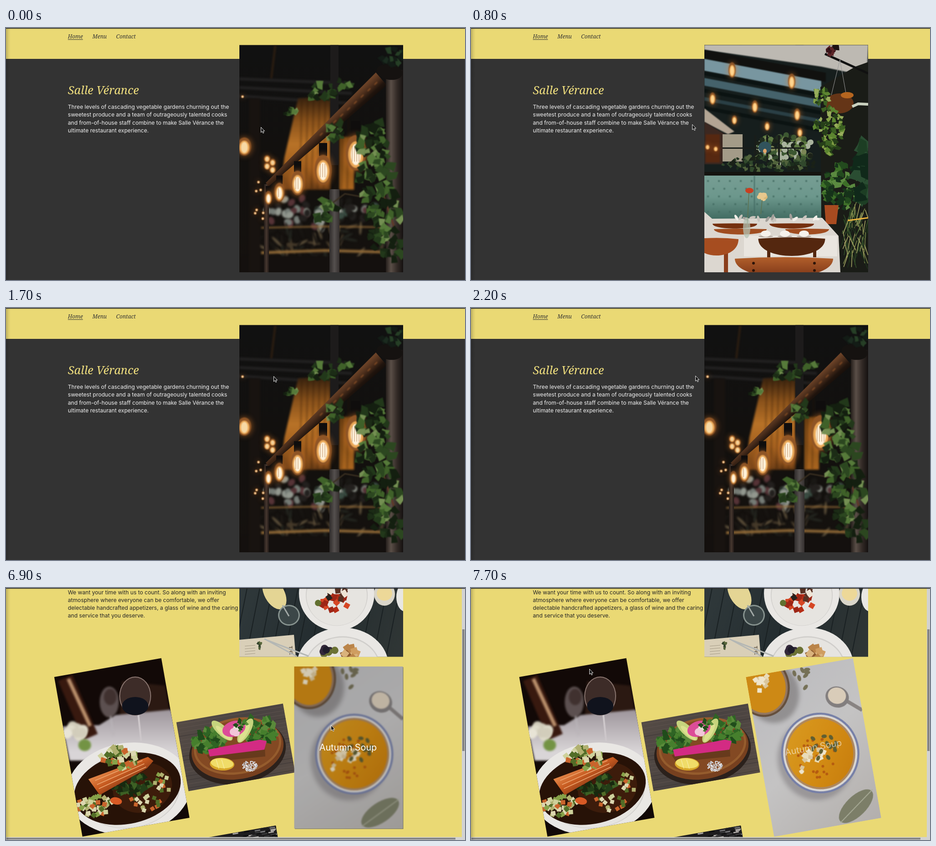
Write an HTML page with a canvas that moves like this. It is 1009 px wide and 555 px high and loops after 8 s.

```html
<!DOCTYPE html>
<html lang="en">
<head>
<meta charset="utf-8">
<title>Restaurant page</title>
<style>
html, body { margin: 0; width: 100%; height: 100%; overflow: hidden; background: #333; }
#stage { position: relative; width: 1009px; height: 555px; overflow: hidden; }
#stage > *, nav span, h1, p { position: absolute; margin: 0; white-space: pre; }
canvas { left: 0; top: 0; }
nav span { top: 9.4px; font: italic 12px/20px Lora, "Noto Serif", serif; color: #333; }
nav u { text-underline-offset: 2px; text-decoration-thickness: 1px; }
h1 { left: 136px; top: 120.5px; font: italic 400 25.2px/30px Lora, "Noto Serif", serif; color: #f0df7e; }
p { left: 136px; font: 12.12px/17.25px Inter, sans-serif; }
#home p { top: 165px; color: #f2f2f2; }
#food p { top: .5px; color: #262626; }
#label { left: 632.5px; top: 173px; width: 239px; height: 357px; text-align: center;
  font: 400 19.8px/357px Inter, sans-serif; color: #fff; }
#arrow { left: 0; top: 0; overflow: visible; }
</style>
</head>
<body>
<div id="stage">
  <canvas id="view" width="1009" height="555"></canvas>
  <div id="home">
    <nav><span style="left:136px"><u>Home</u></span><span style="left:190px">Menu</span><span style="left:242px">Contact</span></nav>
    <h1>Salle Vérance</h1>
    <p>Three levels of cascading vegetable gardens churning out the
sweetest produce and a team of outrageously talented cooks
and from-of-house staff combine to make Salle Vérance the
ultimate restaurant experience.</p>
  </div>
  <div id="food">
    <p>We want your time with us to count. So along with an inviting
atmosphere where everyone can be comfortable, we offer
delectable handcrafted appetizers, a glass of wine and the caring
and service that you deserve.</p>
  </div>
  <div id="label">Autumn Soup</div>
  <svg id="arrow" width="10" height="15"><path d="M.5 .5V12L3.1 9.6 5 13.7 6.9 12.8 5.1 8.9H8.6Z" fill="#111" stroke="#fff" stroke-width=".9"/></svg>
</div>
<script>
const $ = id => document.getElementById(id);
const W = 1009, H = 555, LOOP = 8000, YELLOW = '#ead974', TILT = -10 * Math.PI / 180;
let g, seed;

const rnd = () => {
  seed = seed + 0x6D2B79F5 | 0;
  let v = Math.imul(seed ^ seed >>> 15, 1 | seed);
  v = v + Math.imul(v ^ v >>> 7, 61 | v) ^ v;
  return ((v ^ v >>> 14) >>> 0) / 4294967296;
};
const pick = list => list[rnd() * list.length | 0];
const times = (n, fn) => { for (let i = 0; i < n; i++) fn(i); };

// drawing helpers; points are flat x, y lists
function trace(p) {
  g.beginPath();
  for (let i = 0; i < p.length; i += 2) g.lineTo(p[i], p[i + 1]);
}
function poly(c, ...p) { trace(p); g.fillStyle = c; g.fill(); }
function line(c, w, ...p) { trace(p); g.strokeStyle = c; g.lineWidth = w; g.stroke(); }
function box(c, x, y, w, h) { g.fillStyle = c; g.fillRect(x, y, w, h); }
function oval(c, x, y, rx, ry = rx, a = 0) {
  g.beginPath(); g.ellipse(x, y, rx, ry, a, 0, 7); g.fillStyle = c; g.fill();
}
function fade(x0, y0, x1, y1, ...cols) {
  const f = g.createLinearGradient(x0, y0, x1, y1);
  cols.forEach((c, i) => f.addColorStop(i / (cols.length - 1), c));
  return f;
}
function soft(px, paint) { g.filter = `blur(${px}px)`; paint(); g.filter = 'none'; }
function scatter(n, x, y, rx, ry, put) {
  times(n, () => {
    const a = rnd() * 6.28, r = Math.sqrt(rnd());
    put(x + Math.cos(a) * r * rx, y + Math.sin(a) * r * ry);
  });
}
function dots(n, x, y, rx, ry, w, h, cols) {
  scatter(n, x, y, rx, ry, (dx, dy) => oval(pick(cols), dx, dy, w, h, w === h ? 0 : rnd() * 3));
}
function leaves(n, x, y, rx, ry, size, cols) {
  scatter(n, x, y, rx, ry, (lx, ly) => {
    const a = rnd() * 6.28, s = size * (.6 + rnd() * .7), p = [];
    times(7, i => {
      const r = s * (i ? .45 + i % 2 * .25 : 1);
      p.push(lx + Math.cos(a + i * .9) * r, ly + Math.sin(a + i * .9) * r);
    });
    poly(pick(cols), ...p);
  });
}
function cubes(n, x, y, rx, ry, s, cols) {
  scatter(n, x, y, rx, ry, (cx, cy) => {
    const a = rnd() * 1.5, u = Math.cos(a) * s, v = Math.sin(a) * s;
    poly(pick(cols), cx + u, cy + v, cx - v, cy + u, cx - u, cy - v, cx + v, cy - u);
  });
}
function bulb(x, y, rx, ry, core = '#fff3dc') {
  soft(6, () => oval('rgba(230,130,45,.4)', x, y, rx * 1.2, ry * 1.1));
  soft(1.2, () => {
    oval('#8f5526', x, y, rx, ry);
    oval('#eba958', x, y + ry * .1, rx * .75, ry * .75);
    oval(core, x, y + ry * .1, rx * .5, ry * .6);
  });
}
function plate(x, y, rx, ry, a = 0) {
  oval('#e9e7e4', x, y, rx, ry, a);
  oval('#d0cecb', x, y + 4, rx * .82, ry * .82, a);
  oval('#e6e4e0', x, y + 5, rx * .8, ry * .8, a);
}
function chair(c, x, y, w, h) {
  const l = x - w / 2, r = x + w / 2;
  g.beginPath();
  g.moveTo(l, y);
  g.quadraticCurveTo(x, y - h * .15, r, y);
  g.bezierCurveTo(r, y + h * 1.3, l, y + h * 1.3, l, y);
  g.fillStyle = c; g.fill();
}

// a clipped picture of size w, h centred on cx, cy
function photo(cx, cy, w, h, angle, s, paint) {
  const c = document.createElement('canvas');
  c.width = W; c.height = H;
  g = c.getContext('2d');
  seed = s;
  g.translate(cx, cy); g.rotate(angle);
  g.beginPath(); g.rect(-w / 2, -h / 2, w, h); g.clip();
  g.setTransform(1, 0, 0, 1, 0, 0);
  paint();
  return c;
}

const ivy = ['#1c2c16', '#2c4720', '#3f6129', '#567a3a', '#141f10', '#22381a', '#748f52'];
const fresh = ['#5c8530', '#3c6022', '#829f45', '#263f19', '#98ad5c'];

const lamps = photo(693, 287.75, 360, 500.5, 0, 5, () => {
  box(fade(0, 37, 0, 538, '#111', '#12100e', '#15110e'), 513, 37, 360, 501);
  soft(2, () => {
    line('#3a2411', 3, 592, 38, 583, 112);
    times(3, i => line('#232222', 6, 513, 112 + i * 19, 760, 122 + i * 22));
    poly(fade(0, 155, 0, 356, '#3a230f', '#8a521b', '#b87227', '#a3601f', '#693c16'), 642, 155, 713, 150, 713, 356, 603, 356, 612, 285);
    box(fade(0, 235, 0, 356, '#704214', '#a9651f'), 733, 240, 32, 116);
    times(9, i => line('rgba(40,20,5,.5)', 2, 650 + i * 13, 160, 646 + i * 13, 355));
    dots(70, 695, 405, 135, 36, 9, 7, ['#767c76', '#553336', '#394b41', '#93988f', '#23201e', '#1a1815']);
    dots(60, 700, 470, 150, 38, 15, 3, ['#463a2a', '#181512', '#5a4d38', '#23251f', '#1c1814']);
    times(2, i => line('#8f6836', 6 - i * 3, 560, 495 - i * 55, 700, 490 - i * 53, 850, 494 - i * 55));
    box('#14100e', 513, 503, 360, 36);
    box('#181310', 534, 155, 25, 383);
  });
  box('#1d1b1b', 713, 37, 18, 265);
  box(fade(708, 0, 736, 0, '#252121', '#55504e', '#2b2625'), 711, 355, 22, 183);
  box(fade(566, 0, 579, 0, '#1b1513', '#46372f', '#1a1412'), 567, 344, 11, 194);
  bulb(524, 261, 15, 20, '#f7d9a5');
  times(4, i => bulb(574 + i % 2 * 12, 288 + i * 8, 7, 8, '#f7d9a5'));
  scatter(7, 557, 400, 14, 75, (x, y) => bulb(x, y, 3, 3));
  bulb(520, 151, 3, 3);
  poly(fade(688, 218, 714, 246, '#6b4227', '#4a2d1b', '#20140d', '#120c09'), 571, 341, 813, 98, 837, 126, 577, 349);
  soft(1.5, () => times(9, i => line('#b9692f', 1.5, 690 + i * 15, 237 - i * 14, 696 + i * 15, 231 - i * 14)));
  box(fade(833, 0, 873, 0, '#1b1613', '#5a4e47', '#322a26', '#151110'), 835, 92, 38, 446);
  oval('#151210', 843, 97, 29, 17, .15);
  times(5, u => {
    const x = 577 + 16 * u + 8 * u * u, y = 374 - 8 * u - 4.2 * u * u;
    const rx = 8 + 3.6 * u, ry = 15 + 6 * u, cap = 14 + 5 * u;
    box('#0f0d0d', x - 6 - u, y - ry - cap + 3, 12 + 2 * u, cap);
    bulb(x, y, rx, ry);
    times(u, i => line('rgba(150,85,30,.6)', 1, x - u * 2 + i * 5, y - ry * .4, x - u * 2 + i * 5, y + ry * .5));
  });
  soft(.9, () => {
    line('#5f3928', 4, 826, 355, 842, 405, 858, 452);
    line('#3a2f20', 3, 705, 395, 745, 365, 800, 375);
    leaves(22, 690, 140, 32, 24, 12, ivy);
    leaves(7, 742, 124, 16, 10, 11, ivy);
    leaves(9, 628, 185, 20, 6, 9, ivy);
    leaves(14, 724, 228, 20, 25, 13, ivy);
    leaves(15, 703, 405, 22, 28, 13, ivy);
    leaves(16, 848, 58, 25, 28, 13, ['#131c16', '#1b2b1f', '#263f26']);
    times(130, i => {
      const u = i / 130;
      leaves(1, 808 + 44 * u * u, 215 + 290 * u, 40, 16, 15, ivy);
    });
  });
});

const tables = photo(693, 287.75, 360, 500.5, 0, 11, () => {
  box('#161e1d', 513, 37, 360, 501);
  // roof beams and panes share one slope
  const slope = (c, y, h, x1 = 770) => poly(c, 513, y, x1, y + (x1 - 513) * .19, x1, y + h + (x1 - 513) * .19, 513, y + h);
  soft(1, () => {
    poly('#bdb9b2', 513, 37, 873, 37, 870, 106, 770, 85, 513, 48);
    slope('#11110f', 48, 20, 780);
    times(3, i => slope(['#7896a0', '#45626b', '#2a3f45'][i], 68 + i * 42, 26 - i * 9));
    times(3, i => slope('#0b1312', 96 + i * 38, 8));
    poly('#b3a594', 513, 177, 579, 228, 565, 234, 513, 207);
    poly('#3c2821', 513, 207, 560, 235, 553, 300, 513, 300);
  });
  soft(1.5, () => {
    box('#562811', 516, 234, 31, 62);
    times(2, i => bulb(520 + i * 18, 262 + i * 4, 5, 6, '#ffc983'));
    box('#a39b88', 553, 234, 44, 60);
    dots(160, 690, 268, 66, 34, 6, 6, ['#a9b39d', '#3c5731', '#5c7841', '#202c1e', '#7c8757', '#1c2219']);
    times(4, i => box('#191d1a', 597 + i * 26, 236, 4, 70));
    box('#191d1a', 553, 263, 180, 3);
    oval('#31535c', 646, 263, 14, 13); oval('#e3a669', 646, 271, 4, 5);
    leaves(90, 655, 299, 105, 16, 8, ['#31482c', '#50623b', '#1c2d1c', '#1a2117']);
    box('#151410', 513, 317, 260, 9);
  });
  box(fade(0, 324, 0, 420, '#779e94', '#6c978c', '#426c62'), 513, 325, 258, 97);
  soft(1, () => {
    line('#436b63', 2, 623, 325, 623, 415);
    times(55, i => oval('#426960', 521 + i % 11 * 24 + (i / 11 | 0) % 2 * 12, 337 + (i / 11 | 0) * 17, 2));
  });
  times(8, i => {
    const row = (i + 1) / 3 | 0, n = (i + 1) % 3 - (row ? 0 : 1);
    const x = [574, 531, 579][row] + n * [131, 93, 72][row], y = 81 + row * 71 - (row > 1 ? 33 : 0) + (x - 513) * .19;
    bulb(x, y, 8 - row, 17 - row * 3.5, '#ffd691');
  });
  poly('#1a1c17', 768, 130, 845, 85, 873, 75, 873, 538, 800, 538, 770, 420);
  line('#111', 5, 778, 57, 873, 100);
  times(2, i => line('#999', 1, 811, 70, 792 + i * 33, 148));
  leaves(14, 795, 47, 16, 11, 9, ['#3a1419', '#1c1112', '#5c2528']);
  oval('#653517', 810, 166, 31, 22); oval('#b5651f', 827, 148, 14, 7);
  soft(.7, () => {
    leaves(18, 771, 153, 16, 22, 9, fresh);
    leaves(75, 786, 225, 30, 52, 9, fresh);
    leaves(90, 815, 350, 40, 52, 11, ['#3d6f28', '#234a1e', '#5b8a40', '#16321a']);
  });
  line('#cad1bf', 6, 838, 173, 851, 167, 873, 168);
  leaves(28, 861, 330, 16, 70, 22, ['#1d3e24', '#10291a', '#2a4d32']);
  poly('#a84b20', 777, 390, 808, 390, 803, 432, 780, 432);
  scatter(80, 845, 440, 30, 60, (x, y) =>
    line(pick(['#7d8a4a', '#33502a', '#a9a966', '#1e331c']), 1.5, x, y, x + (rnd() - .5) * 34, y + 20 + rnd() * 24));
  line('#e9b13c', 3, 828, 424, 873, 418);
  poly('#dcd7d0', 513, 405, 530, 420, 772, 418, 808, 458, 812, 538, 513, 538);
  soft(.7, () => {
    dots(14, 660, 419, 110, 4, 7, 3, ['#f3efe9', '#a39f9a', '#c9c4bd']);
    times(2, i => chair('#75300f', 580 + i * 125, 431, 98, 11));
    times(2, i => chair('#a04d20', 592 + i * 147, 443, 116 - i * 20, 12));
    box('#e9e5df', 600, 457, 205, 46);
    times(3, i => { oval('#b5aaa0', 648 + i * 42, 459, 16, 2); oval('#f6f2ec', 648 + i * 42, 453, 11, 7); });
  });
  box('#8a3e1c', 556, 490, 9, 48);
  chair('#a64d20', 540, 465, 96, 37);
  times(2, i => box('#54270f', 651 + i * 101, 485, 7, 20));
  chair('#54270f', 705, 464, 147, 39);
  chair(fade(0, 503, 0, 538, '#b4612c', '#8a401c'), 688, 508, 216, 42);
  times(4, i => oval('#2d1409', 621 + i % 2 * 134, 518 + (i >> 1) * 16, 3));
  line('#5e7250', 1.5, 611, 361, 607, 440);
  oval('rgba(180,195,180,.75)', 606, 440, 8, 23);
  oval('#c93f20', 612, 358, 9, 6);
  dots(6, 641, 372, 9, 5, 6, 5, ['#e8c88d', '#d9b877']);
  line('#5e7250', 1.5, 640, 379, 637, 410);
});

const dinner = photo(693, 71.5, 360, 160, 0, 3, () => {
  box(fade(513, 0, 873, 151, '#30393b', '#242d30', '#303635'), 513, 0, 360, 152);
  times(13, i => line('#1a2123', 2, 500 + i * 28, 151, 530 + i * 28, 0));
  oval('#e4d594', 590, 12, 22, 38, -.5);
  oval('#87938f', 622, 60, 24, 23); oval('#3c4748', 622, 60, 21, 20);
  line('#a3aaa7', 3, 608, 38, 622, 62);
  plate(727, 12, 83, 82);
  cubes(17, 727, 33, 33, 20, 8, ['#b62d16', '#d64624', '#9d2616']);
  cubes(13, 725, 11, 25, 20, 8, ['#eee4d6', '#27211d', '#593224']);
  oval('#62702f', 686, 33, 7);
  oval('#d9d5c9', 832, 13, 23, 26); oval('#edd898', 832, 12, 17, 16);
  oval('#e8e7e3', 878, 20, 20, 32);
  plate(740, 172, 101, 85);
  cubes(14, 757, 143, 20, 13, 10, ['#ba8449', '#cf9d60', '#8a592e', '#d9b27c']);
  dots(9, 711, 139, 17, 9, 8, 8, ['#6b7134', '#201d2b', '#33283a']);
  poly('#d9cfb8', 513, 114, 633, 103, 637, 152, 513, 152);
  g.fillStyle = '#53483b'; g.font = 'bold 10px Lato, sans-serif';
  g.save(); g.translate(622, 128); g.rotate(1.5); g.fillText('THE', 0, 0); g.restore();
  times(4, i => line('#a59b86', 1, 525, 128 + i * 6, 548, 126 + i * 6));
  leaves(7, 555, 126, 6, 9, 5, ['#58663a', '#32432b']);
  times(2, i => line('#b4b7b4', 3, 568 + i * 6, 112 + i * 3, 640 + i * 25, 151 - i));
});

const salmon = photo(254.7, 351, 239, 357, TILT, 8, () => {
  box('#120907', 100, 150, 310, 400);
  soft(2, () => {
    poly('#2b1912', 255, 205, 350, 215, 365, 300, 250, 290);
    poly(fade(0, 270, 0, 360, '#9e969c', '#d9d5d7'), 124, 305, 205, 302, 240, 280, 362, 268, 410, 380, 140, 380);
    line('#38190f', 34, 130, 198, 186, 328);
    line('#b98f6b', 8, 137, 200, 185, 304);
    dots(9, 152, 316, 22, 16, 11, 11, ['#dfdbca', '#d2cdbb', '#e8e4d6']);
    oval('#739344', 173, 346, 14, 13);
    oval('rgba(125,112,111,.7)', 227, 251, 21, 34); oval('#40312f', 229, 240, 14, 18);
    line('#bab5b9', 3, 230, 282, 236, 325);
  });
  oval('#8a7670', 284, 238, 35, 43); oval('#3d2c28', 284, 238, 33, 41); oval('#10131d', 284, 260, 29, 20);
  line('#cdc7ca', 4, 291, 280, 297, 337);
  plate(270, 442, 137, 101, -.13);
  oval('#271207', 267, 442, 119, 77, -.23); oval('#3d1c0b', 300, 440, 66, 54, -.3);
  const dice = ['#ced19b', '#87a249', '#dcd7b0', '#c9642c', '#b0b070', '#526d27'];
  leaves(42, 270, 430, 47, 23, 12, ['#233e18', '#3d6024', '#17290f']);
  cubes(44, 197, 480, 42, 22, 7, dice);
  cubes(18, 305, 470, 34, 20, 6, dice);
  cubes(12, 345, 428, 18, 24, 6, dice);
  poly(fade(230, 390, 260, 440, '#e58a4b', '#c65a20', '#843715'), 181, 421, 312, 372, 324, 381, 310, 397, 206, 456);
  times(3, i => line('#eda670', 1.5, 196 + i * 4, 424 + i * 9, 300 + i * 4, 380 + i * 7));
  cubes(46, 247, 374, 40, 24, 8, dice);
  oval('#d85a25', 242, 469, 13, 8, .2);
});

const toast = photo(505, 351, 238, 154, TILT, 4, () => {
  box(fade(380, 280, 630, 430, '#554b45', '#494341', '#574b44'), 370, 250, 270, 200);
  times(31, i => line(pick(['#3c3635', '#5d524d']), 1, 370, 230 + i * 9, 640, 184 + i * 9));
  times(4, i => oval(['#2b211c', '#77401f', '#955c2d', '#834923'][i], 509, 360 - Math.min(i, 2) * 6, 107 - i * 5, 72 - i * 5, -.17));
  const rocket = ['#2f6424', '#467f2d', '#204c1b', '#5a8a3a'];
  leaves(55, 450, 340, 36, 28, 12, rocket);
  leaves(50, 556, 314, 36, 30, 12, rocket);
  poly('#673a1c', 441, 368, 569, 352, 570, 371, 451, 383);
  poly('#d32b83', 444, 356, 558, 334, 573, 337, 568, 356, 448, 371);
  times(2, i => {
    oval('#c6d47d', 475 + i * 51, 314, 30, 11, .75 - i * 1.8);
    oval('#dce18f', 478 + i * 46, 319, 22, 6, .75 - i * 1.8);
  });
  oval('#dc4d98', 501, 310, 26, 17, -.3);
  dots(4, 500, 315, 10, 5, 8, 8, ['#f1c6d8', '#e5e4d3']);
  leaves(12, 517, 304, 13, 12, 7, rocket);
  oval('#d7a629', 475, 388, 27, 14, .05); oval('#f0dc68', 475, 386, 25, 11, .1);
  times(2, i => line('#faf0b5', 1, 462 + i * 12, 378, 468 + i * 12, 398));
  scatter(170, 535, 391, 17, 12, (x, y) => box(pick(['#f0f0f2', '#c3c7d0']), x, y, 2, 2));
});

// drawn upright on its hovered place
const soup = photo(752.5, 351.5, 239, 357, 0, 9, () => {
  box(fade(633, 173, 872, 530, '#bebec2', '#c8c7c7', '#b7b3b0'), 633, 173, 239, 357);
  soft(5, () => { oval('rgba(80,76,76,.4)', 685, 218, 58, 66); oval('rgba(100,95,100,.4)', 753, 378, 84, 90); });
  const bowl = (x, y, rx, ry, rims) => rims.forEach((c, i) => oval(c, x, y, rx - i * 4.5, ry - i * 4.5));
  bowl(666, 200, 59, 67, ['#66503c', '#967963', '#d18c15']);
  bowl(765, 366, 86, 89, ['#7882aa', '#dedbd7', '#b08a61', fade(690, 320, 840, 420, '#dc9c21', '#d78f14', '#cb800d')]);
  dots(35, 758, 373, 45, 47, 3, 3, ['#b95d10']);
  const bread = ['#eee0be', '#dec99e', '#f4ead0'];
  cubes(16, 751, 371, 25, 18, 7, bread);
  cubes(3, 715, 393, 8, 10, 6, bread);
  cubes(13, 667, 195, 26, 18, 7, bread);
  dots(13, 773, 353, 31, 33, 6, 4, ['#616033']);
  dots(7, 757, 200, 27, 26, 7, 4, ['#777258']);
  line('#8b8685', 8, 843, 264, 872, 289);
  oval('#858181', 823, 251, 26, 23, .5); oval('#ddd0bd', 823, 248, 20, 18, .4);
  oval('#7e816a', 822, 495, 48, 22, -.6);
  line('#adaf9b', 2, 782, 525, 864, 465);
});

const next = photo(484, 593, 239, 100, TILT, 6, () => {
  box('#1d1c1d', 350, 520, 260, 40);
  scatter(40, 550, 542, 55, 18, (x, y) => line(pick(['#747476', '#383839', '#0d0d0d', '#aaa6a2']), 3, x, y, x + 12, y - 2));
});

// values at time t from [time, ...values] keys, linear between keys
function at(keys, t) {
  let i = 0;
  while (i < keys.length - 1 && keys[i + 1][0] <= t) i++;
  const a = keys[i], b = keys[i + 1] || a;
  const k = b === a ? 0 : Math.max(0, (t - a[0]) / (b[0] - a[0]));
  return a.slice(1).map((v, n) => v + (b[n + 1] - v) * k);
}
const pointer = [[400, 560, 218], [800, 486, 212], [1300, 371, 199], [1400, 358, 196], [1500, 520, 164],
  [1700, 588, 150], [2100, 588, 150], [2200, 493, 149], [2700, 338, 111]];
const swap = [[500, 0], [800, 1], [1400, 1], [1700, 0], [2200, 0], [2500, 1]];

function drawHome(t) {
  box('#333', 0, 0, W, H);
  box(YELLOW, 0, 1, W, 67);
  g.drawImage(lamps, 0, 0);
  g.globalAlpha = at(swap, t)[0];
  g.drawImage(tables, 0, 0);
  g.globalAlpha = 1;
  return at(pointer, t);
}

function drawFood(t) {
  const hover = t < 7700, blur = t < 7300 ? 1.5 : hover ? 2 : .7;
  const angle = hover ? 0 : TILT;
  box(YELLOW, 0, 0, W, H);
  for (const p of [dinner, salmon, toast, next]) g.drawImage(p, 0, 0);
  g.save();
  g.translate(753, 351.3);
  g.rotate(angle);
  if (hover) box('#77745f', -118, -177, 238.5, 356.5);
  g.beginPath(); g.rect(-119.5, -178.5, 239, 357); g.clip();
  g.drawImage(soup, -752.5, -351.5);
  soft(blur, () => g.drawImage(soup, -752.5, -351.5));
  box(`rgba(0,0,0,${hover ? .14 : .02})`, -120, -179, 240, 358);
  g.restore();
  box('#d2d2d2', 1002, 0, 7, H); box('#858585', 1003, 91, 5, 268);
  box('#d2d2d2', 0, 548.5, W, 6.5); box('#858585', 1, 550, 987, 4);
  $('label').style.opacity = hover ? 1 : .55;
  $('label').style.transform = `rotate(${angle}rad)`;
  return hover ? [714, 302] : [260, 178];
}

const view = $('view').getContext('2d');
function draw(now) {
  const t = Math.floor(now % LOOP / 100) * 100, home = t < 6900;
  g = view;
  const [x, y] = home ? drawHome(t) : drawFood(t);
  box(fade(0, 0, 10, 0, 'rgba(0,0,0,.2)', 'rgba(0,0,0,.07)', 'rgba(0,0,0,0)'), 0, 0, 10, H);
  box('#252525', 0, 0, W, 1.5);
  $('home').style.display = home ? '' : 'none';
  $('food').style.display = $('label').style.display = home ? 'none' : '';
  $('arrow').style.transform = `translate(${x}px,${y}px)`;
}
const start = performance.now();
function tick() {
  draw(performance.now() - start);
  requestAnimationFrame(tick);
}
tick();
</script>
</body>
</html>
```
